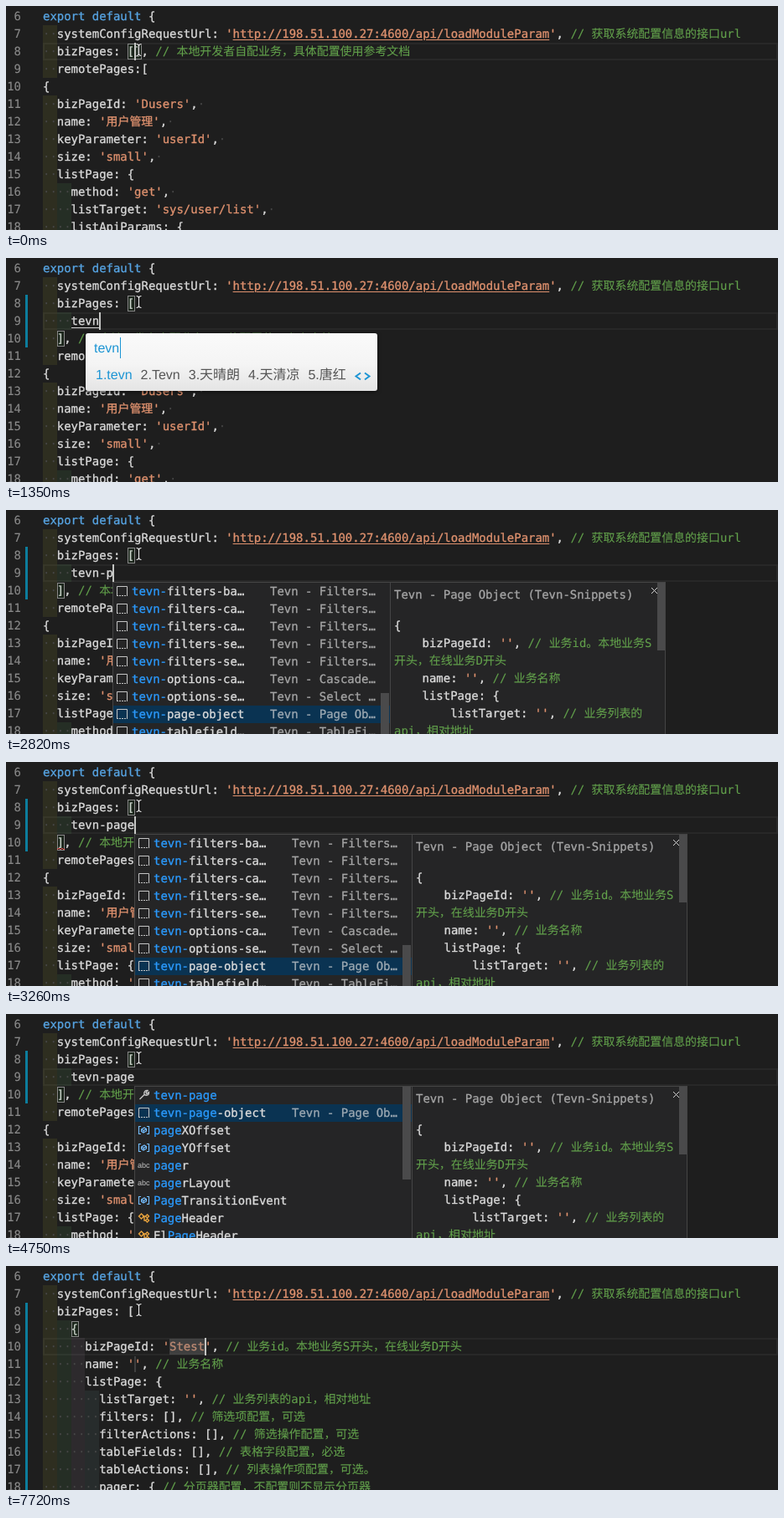
Write an HTML page that moves like this. It is 921x268 px and loops after 8 s.

```html
<!DOCTYPE html>
<html lang="zh-CN">
<head>
<meta charset="utf-8">
<title>Editor snippet</title>
<style>
html, body { margin: 0; width: 100%; height: 100%; overflow: hidden; background: #1e1e1e; }
#stage {
  position: relative; width: 921px; height: 268px; overflow: hidden;
  background: #1e1e1e; color: #dcdcdc;
  font: 13.95px/21px "DejaVu Sans Mono", "Noto Sans CJK SC", "Noto Sans CJK", monospace;
  font-variant-ligatures: none; text-rendering: geometricPrecision; white-space: pre;
  -webkit-text-stroke: .3px;
}
#stage div, #stage svg { position: absolute; box-sizing: border-box; }
#stage b { font-weight: normal; color: #2b9bff; }
.num { color: #8a8a8a; text-align: right; -webkit-text-stroke: .1px; }
.key { color: #57a5e4; }
.str { color: #e0926f; }
.url { text-decoration: underline 1px; text-underline-offset: 2px; }
.com { color: #62a04b; -webkit-text-stroke: .1px; }
.dot { color: #474747; -webkit-text-stroke: 0; }
.row { border: 2px solid #282828; }
.bar { background: #0c7d9d; }
.pair { border: 1px solid #888; background: rgba(0, 100, 0, .1); }
.stop { background: rgba(124, 124, 124, .35); }
.caret { background: #c4c5c3; }
.compose { background: #d4d4d4; }
.panel { background: #252526; border: 1px solid #454545; overflow: hidden; }
.picked { background: #0a3352; }
.dim { opacity: .7; }
.thumb { background: #4a4a4b; }
.ime {
  border-radius: 3px; background: linear-gradient(#fafafa, #f4f4f4 55%, #e4e4e4);
  box-shadow: 0 1px 4px rgba(0, 0, 0, .6); color: #555;
  font: 16px/22px "Liberation Sans", "Noto Sans CJK SC", "Noto Sans CJK", sans-serif;
  -webkit-text-stroke: 0;
}
.ime .on { color: #1d95d4; }
.ime .words { display: flex; gap: 10px; }
</style>
</head>
<body>
<div id="stage"></div>
<script>
const CH = 8.398, LINE = 21, LEFT = 44, FIRST = 6, LOOP = 8000;
const stage = document.getElementById('stage');

const colX = col => LEFT + col * CH;
const rowY = line => 2 + (line - FIRST) * LINE;
const box = (cls, x, y, w, h, html = '') =>
  `<div class="${cls}" style="left:${x}px;top:${y}px;width:${w}px;height:${h}px">${html}</div>`;
const span = (cls, text) => `<span class="${cls}">${text}</span>`;
const svg = (x, y, w, h, body) =>
  `<svg style="left:${x}px;top:${y}px" width="${w}" height="${h}" fill="none">${body}</svg>`;
const path = (d, color, width = 1) => `<path d="${d}" stroke="${color}" stroke-width="${width}"/>`;

// Code text
const head = [
  'export default {',
  "  systemConfigRequestUrl: 'http://198.51.100.27:4600/api/loadModuleParam', // 获取系统配置信息的接口url"
];
const note = '], // 本地开发者自配业务，具体配置使用参考文档';
const tail = [
  '  remotePages:[', '{', "  bizPageId: 'Dusers', ", "  name: '用户管理', ",
  "  keyParameter: 'userId', ", "  size: 'small', ", '  listPage: {',
  "    method: 'get', ", "    listTarget: 'sys/user/list', ", '    listApiParams: {'
];
const code = {
  flat: () => [...head, '  bizPages: [' + note, ...tail],
  open: word => [...head, '  bizPages: [', '    ' + word, '  ' + note, ...tail],
  filled: word => [...head, '  bizPages: [', '    {',
    `      bizPageId: '${word}', // 业务id。本地业务S开头，在线业务D开头`,
    "      name: '', // 业务名称",
    '      listPage: {',
    "        listTarget: '', // 业务列表的api，相对地址",
    '        filters: [], // 筛选项配置，可选',
    '        filterActions: [], // 筛选操作配置，可选',
    '        tableFields: [], // 表格字段配置，必选',
    '        tableActions: [], // 列表操作项配置，可选。',
    '        pager: { // 分页器配置，不配置则不显示分页器']
};
const docText = ['{', "    bizPageId: '', // 业务id。本地业务S", '//开头，在线业务D开头',
  "    name: '', // 业务名称", '    listPage: {', "        listTarget: '', // 业务列表的", '//api，相对地址'];

// Caret line, caret column before the word, bracket boxes [line, column]
const layout = {
  flat: { line: 8, col: 13, pairs: [[8, 12], [8, 13]] },
  open: { line: 9, col: 4, pairs: [[8, 12], [10, 2]] },
  filled: { line: 10, col: 18, pairs: [[9, 4]] }
};

// Suggestions: icon, label with [matched] letters, detail
const snip = (name, detail) => ['snippet', name, 'Tevn - ' + detail];
const field = snip('[tevn]-tablefield…', 'TableFi…');
const lists = {
  word: { picked: 0, thumb: [227, 60], items: [
    snip('[tevn]-page-object', 'Page Ob…'), field, field, field, field,
    ['keyword', '[thro]w'], ['value', 'fa[Th]erm[o]mete[r]'],
    ['value', 'fa[Th]erm[o]mete[r]Empty'], ['value', 'fa[Th]erm[o]mete[r]Full']] },
  dash: { picked: 7, thumb: [219, 60], items: [
    ...['ba', 'ca', 'ca', 'se', 'se'].map(k => snip(`[tevn-]filters-${k}…`, 'Filters…')),
    snip('[tevn-]options-ca…', 'Cascade…'), snip('[tevn-]options-se…', 'Select …'),
    snip('[tevn-]page-object', 'Page Ob…'), snip('[tevn-]tablefield…', 'TableFi…')] },
  page: { picked: 0, thumb: [87, 111], items: [
    ['wrench', '[tevn-page]'], snip('[tevn-page]-object', 'Page Ob…'),
    ['value', '[page]XOffset'], ['value', '[page]YOffset'],
    ['abc', '[page]r'], ['abc', '[page]rLayout'], ['value', '[Page]TransitionEvent'],
    ['class', '[Page]Header'], ['class', 'El[Page]Header']] }
};
lists.pick = { ...lists.page, picked: 1 };

const icons = {
  snippet: path('M1.5 13V2.5H13.5V13', '#c5c5c5') +
    '<path d="M1 13.5H14" stroke="#c5c5c5" stroke-dasharray="2 1"/>',
  keyword: path('M1 3.5H6M8 3.5H10M1 6.5H4M6 6.5H14M1 9.5H9M11 9.5H14M1 12.5H7', '#c5c5c5', 1.5),
  value: path('M4 3.5H1.5V12.5H4M11 3.5H13.5V12.5H11M4.5 7L8 5L10.5 6.5V9L7 11L4.5 9.5ZM4.5 7L7 8.5L10.5 6.5M7 8.5V11', '#75beff', 1.1),
  abc: '<text x="0" y="11" font-size="9" font-family="Liberation Sans, sans-serif" fill="#c5c5c5">abc</text>',
  wrench: path('M2.5 13L8 7.5M8 7.5C7 4 9.5 2 12 2.5L10 5L11 6.5L13.5 4.5C14 8 11 9 8 7.5', '#c5c5c5', 1.4),
  class: path('M4.5 3L7.5 6L4.5 9L1.5 6ZM6 6H10.5M8 6V11H10.5M11.5 4L13.5 6L11.5 8L9.5 6ZM11.5 9L13.5 11L11.5 13L9.5 11Z', '#e8a33d', 1.4)
};

const guesses = {
  t: '他 她 它 天 听', te: '特 te 忑 忒 铽', tevn: 'tevn Tevn 天晴朗 天清凉 唐红'
};

// Each step changes part of the state from its time on
const steps = [
  [0, { mode: 'flat', word: '', caret: 1, bar: 0, ime: 0, list: '', doc: '', error: 0 }],
  [150, { mode: 'open' }],
  [300, { bar: 63 }],
  [750, { caret: 0 }],
  [1050, { word: 't', ime: 1, caret: 1 }],
  [1200, { word: 'te' }],
  [1350, { word: 'tevn' }],
  [1490, { ime: 0 }],
  [1640, { list: 'word' }],
  [1790, { doc: 'full' }],
  [1930, { caret: 0 }],
  [2380, { word: 'tevn-', list: 'dash', caret: 1 }],
  [2820, { word: 'tevn-p' }],
  [2970, { word: 'tevn-pa' }],
  [3110, { word: 'tevn-pag', error: 1 }],
  [3260, { word: 'tevn-page' }],
  [3400, { list: 'page', doc: '' }],
  [3700, { doc: 'short', error: 0, caret: 0 }],
  [4150, { list: 'pick', doc: '', caret: 1 }],
  [4300, { doc: 'full' }],
  [4750, { caret: 0 }],
  [5040, { mode: 'filled', word: '', list: '', doc: '', caret: 1 }],
  [5190, { bar: 224 }],
  [5490, { caret: 0 }],
  [5930, { caret: 1 }],
  [6530, { caret: 0 }],
  [6830, { word: 'S', caret: 1 }],
  [7420, { word: 'St' }],
  [7570, { word: 'Ste' }],
  [7720, { word: 'Stest' }]
];

const paint = text => text.replace(/'[^']*'|\/\/.*$|^export default/g, part =>
  part[0] === '/' ? span('com', part)
    : part[0] === 'e' ? span('key', part)
      : span('str', part.replace(/http[^']+/, url => span('url', url))));

function codeLine(text, i) {
  const y = rowY(FIRST + i);
  const [, lead, body, trail] = text.match(/^( *)(.*?)( *)$/);
  const dots = s => span('dot', '·'.repeat(s.length));
  const tints = ['255,255,64', '127,255,127', '230,200,230', '160,220,220'];
  let html = '';
  for (let k = 0; k < lead.length / 2; k++)
    html += `<div style="left:${colX(k * 2)}px;top:${y}px;width:${2 * CH}px;height:${LINE}px;background:rgba(${tints[k]},.07)"></div>`;
  return html + box('num', 0, y + 1, 18, LINE, FIRST + i) +
    box('', LEFT, y + 1, 900, LINE, dots(lead) + paint(body) + dots(trail));
}

function suggestions(list, x) {
  const rows = list.items.map(([icon, label, detail = ''], i) =>
    box(i === list.picked ? 'picked' : '', 0, i * LINE, 331, LINE,
      svg(3, 2, 16, 16, icons[icon]) +
      box('', 22, 1, 200, LINE, label.replace(/\[(.*?)\]/g, '<b>$1</b>')) +
      box('dim', 187, 1, 140, LINE, detail)));
  const [top, height] = list.thumb;
  return box('panel', x, 86, 332, 200, rows.join('') + box('thumb', 319, top - 87, 10, height));
}

function details(kind, x) {
  const full = kind === 'full';
  const title = full ? 'Tevn - Page Object (Tevn-Snippets)' : '缩写';
  const body = full
    ? docText.map(s => s.startsWith('//') ? span('com', s.slice(2)) : paint(s)).join('\n')
    : '&lt;tevn-page&gt;';
  const w = full ? 329 : 129;
  return box('panel', x, 86, w, full ? 200 : 67,
    box('dim', 4, 5, 320, LINE, title) + box('', 4, 42, 324, 160, body) +
    (full ? box('thumb', w - 11, 0, 10, 81) : '') +
    svg(w - 19, 5, 9, 9, path('M1 1L8 8M8 1L1 8', '#d4d4d4')));
}

function inputWindow(word) {
  const words = guesses[word].split(' ').map((w, i) => span(i ? '' : 'on', `${i + 1}.${w}`));
  return box('ime', 95, 90, 348, 69,
    `<div class="on" style="left:10px;top:8px">${word}<span style="display:inline-block;width:1px;height:25px;margin:-4px 0 -7px 1px;background:#1d95d4"></span></div>` +
    box('words', 12, 40, 310, 22, words.join('')) +
    svg(320, 45, 22, 13, path('M8 2.5L2.5 6.5L8 10.5M13 2.5L18.5 6.5L13 10.5', '#1d95d4', 2)));
}

function view(s) {
  const { line, col, pairs } = layout[s.mode];
  const end = colX(col + s.word.length), y = rowY(line), left = Math.floor(end);
  let html = box('row', LEFT, y, 921 - LEFT, LINE);
  html += code[s.mode](s.word).slice(0, 13).map(codeLine).join('');
  if (s.bar) html += box('bar', 23, 44, 3, s.bar);
  for (const [l, c] of pairs) html += box('pair', colX(c), rowY(l) + 1, 9, 19);
  if (s.mode === 'filled') {
    html += box('stop', colX(col), y + 1, Math.max(2, s.word.length * CH), 19);
    html += box('stop', colX(13), rowY(11) + 1, 2, 19);
  }
  if (s.error) html += svg(colX(2), rowY(10) + 16, 10, 4, path('M0 3L2 1L4 3L6 1L8 3L9 2', '#f14c4c'));
  if (s.ime) html += box('compose', colX(col), y + 18, s.word.length * CH, 1);
  if (s.caret) html += box('caret', left, y, 2, LINE);
  if (s.list) html += suggestions(lists[s.list], left);
  if (s.doc) html += details(s.doc, left + 331);
  if (s.ime) html += inputWindow(s.word);
  const beam = 'M1.5 1.5Q4.5 1.5 4.5 4V13Q4.5 15.5 1.5 15.5M7.5 1.5Q4.5 1.5 4.5 4M4.5 13Q4.5 15.5 7.5 15.5';
  return html + svg(154, 44, 9, 17, path(beam, '#111', 2.4) + path(beam, '#f0f0f0', 1.1));
}

let state = {};
const views = steps.map(([, change]) => view(state = { ...state, ...change }));
const start = performance.now();
let shown = -1;

function tick() {
  const t = (performance.now() - start) % LOOP;
  const now = steps.filter(([at]) => at <= t).length - 1;
  if (now !== shown) stage.innerHTML = views[shown = now];
  requestAnimationFrame(tick);
}
tick();
</script>
</body>
</html>
```
